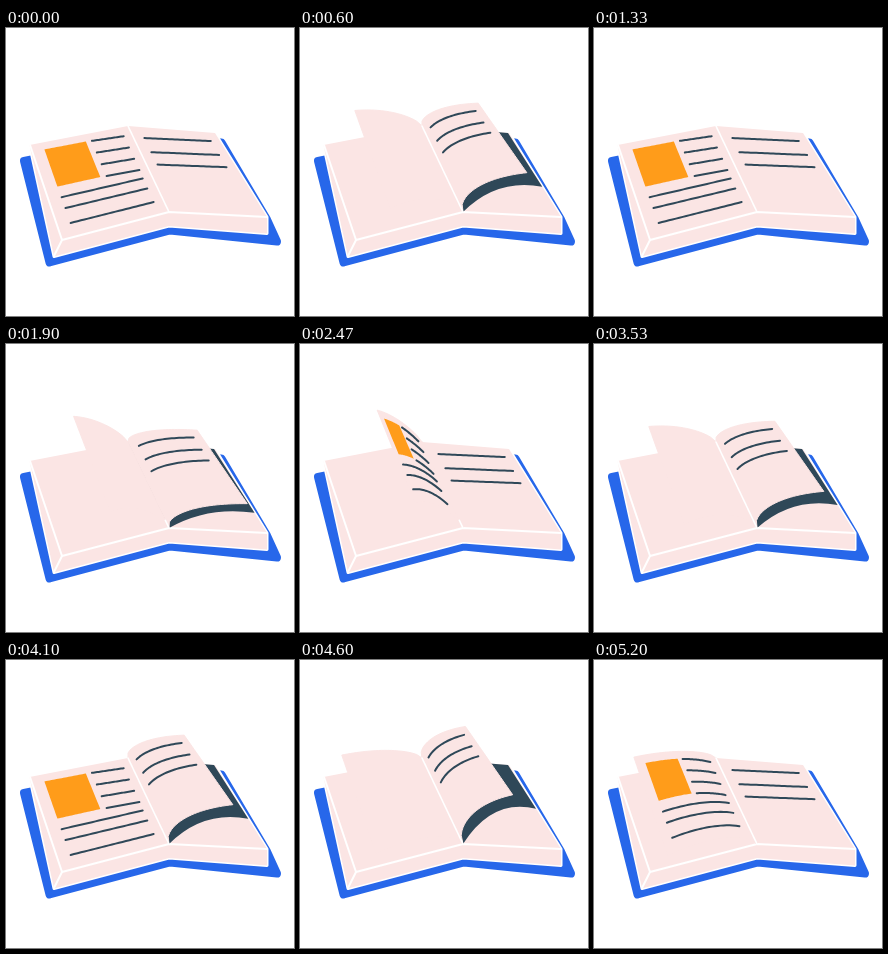
Recreate the animation shown at these times as an HTML page with a canvas. Size 288 px wide and 288 px high, loop 5.26 s.

```html
<!DOCTYPE html>
<html>
<head>
<meta charset="utf-8">
<style>
  html, body { margin: 0; width: 100%; height: 100%; overflow: hidden; background: #fff; }
  canvas { display: block; width: 288px; height: 288px; }
</style>
</head>
<body>
<canvas id="stage" width="288" height="288"></canvas>
<script>
const ctx = document.getElementById('stage').getContext('2d');
const PINK = '#fbe5e4', BLUE = '#2767ea', INK = '#2f4858', ORANGE = '#ff9c1a', WHITE = '#fff';
const LOOP = 5260, CYCLE = 33, SPAN = 13;
const STARTS = [0, 5, 12, 19];
const { PI, sin, cos, sqrt, floor } = Math;

const mix = (a, b, k) => a + (b - a) * k;

// Offset from the spine to the free edge: right side, left side, lift when upright
function swing(angle, right, left, lift) {
  const k = (1 - cos(angle)) / 2;
  return [mix(right[0], left[0], k), mix(right[1], left[1], k) - lift * sin(angle) ** 2];
}

// s runs from 0 (flat on the right) to 1 (flat on the left)
function pose(s) {
  const angle = PI * s + .1 * sin(2 * PI * s) + .07 * sin(4 * PI * s);
  return {
    top: swing(angle, [87, 7], [-98, 18], 57),
    bottom: swing(angle, [98, 5], [-107, 28], 68 + 28 * cos(angle)),
    bulge: sqrt(Math.max(0, sin(PI * s)))
  };
}

// u: spine to free edge, v: top to bottom
function point(p, u, v) {
  const hump = p.bulge * 2.6 * sqrt(u) * (1 - u) * (.8 + .4 * v);
  return [
    122 + 41 * v + u * mix(p.top[0], p.bottom[0], v) - 7 * hump,
    98 + 86 * v + u * mix(p.top[1], p.bottom[1], v) - 12 * hump
  ];
}

// Points along a straight run in page space
function run(p, u0, v0, u1, v1, steps = 24) {
  const pts = [];
  for (let i = 0; i <= steps; i++) pts.push(point(p, mix(u0, u1, i / steps), mix(v0, v1, i / steps)));
  return pts;
}

function patch(p, u0, v0, u1, v1) {
  return [...run(p, u0, v0, u1, v0), ...run(p, u1, v0, u1, v1),
    ...run(p, u1, v1, u0, v1), ...run(p, u0, v1, u0, v0)];
}

function line(pts, color, width) {
  ctx.beginPath();
  pts.forEach(q => ctx.lineTo(...q));
  ctx.strokeStyle = color;
  ctx.lineWidth = width;
  ctx.stroke();
}

function fill(pts, color, edge = 0) {
  ctx.beginPath();
  pts.forEach(q => ctx.lineTo(...q));
  ctx.closePath();
  ctx.fillStyle = ctx.strokeStyle = color;
  ctx.fill();
  ctx.lineWidth = edge;
  if (edge) ctx.stroke();
}

function printRight(p) {
  for (const v of [.13, .295, .44]) line(run(p, .125, v, .89, v - .025), INK, 2);
}

function printLeft(p) {
  fill(patch(p, .46, .08, .88, .472), ORANGE);
  for (let i = 0; i < 4; i++) line(run(p, .4, .085 + .13 * i, .085, .1 + .13 * i), INK, 2);
  for (const v of [.585, .7, .857]) line(run(p, .875, v, .09, v), INK, 2);
}

function drawBook() {
  fill([[18, 133], [43.5, 234.5], [164, 202.5], [271, 213.5], [260.5, 190.5], [215.5, 114.5], [122, 112]], BLUE, 8);
  const body = [[23.5, 117], [48, 228.5], [163, 198], [261, 205.5], [261, 189], [209, 105]];
  line(body, WHITE, 3);
  fill([...body, [122, 98]], PINK);
  line([[24, 117], [56, 212], [163, 184], [261, 189]], WHITE, 2);
  line([[56, 212], [48, 228]], WHITE, 2);
}

function drawShadow(s) {
  const q = 1 - 1.56 * s;
  ctx.beginPath();
  ctx.moveTo(122, 98);
  ctx.lineTo(208, 105);
  ctx.lineTo(mix(209, 261, q), mix(105, 189, q));
  ctx.quadraticCurveTo(212 - 65 * s, 186 - 156 * s, 163, 184);
  ctx.fillStyle = INK;
  ctx.fill();
}

function drawPage({ s, last }) {
  const p = pose(s);
  if (s < .5) drawShadow(s);
  fill(patch(p, 0, 0, 1, 1), PINK, 1);
  if (s < .5) printRight(p);
  else if (last) printLeft(p);
}

function draw(f) {
  const pages = STARTS
    .map((start, i) => {
      const last = i === STARTS.length - 1;
      return { last, s: (f - start) / (last ? CYCLE - start : SPAN) };
    })
    .filter(page => page.s > 0 && page.s < 1);
  const rising = pages.filter(page => page.s < .5);
  const falling = pages.filter(page => page.s >= .5);

  ctx.fillStyle = WHITE;
  ctx.fillRect(0, 0, 288, 288);
  drawBook();
  if (f < SPAN) printLeft(pose(1));
  if (!rising.length) printRight(pose(0));
  rising.reverse().forEach(drawPage);
  falling.forEach(drawPage);

  // An upright page hides most of the spine
  const upright = pages.some(page => page.s > .35 && page.s < .73);
  line(run(pose(0), 0, upright ? .91 : 0, 0, 1), WHITE, 1.6);
}

// Drawn at 25 poses a second, shown on a 30 per second grid
function tick(now) {
  const step = floor((now % LOOP + 4) * .03);
  draw(floor(step * 5 / 6) % CYCLE);
}

ctx.lineJoin = ctx.lineCap = 'round';
const begun = performance.now();
function loop() {
  tick(performance.now() - begun);
  requestAnimationFrame(loop);
}
loop();
</script>
</body>
</html>
```
